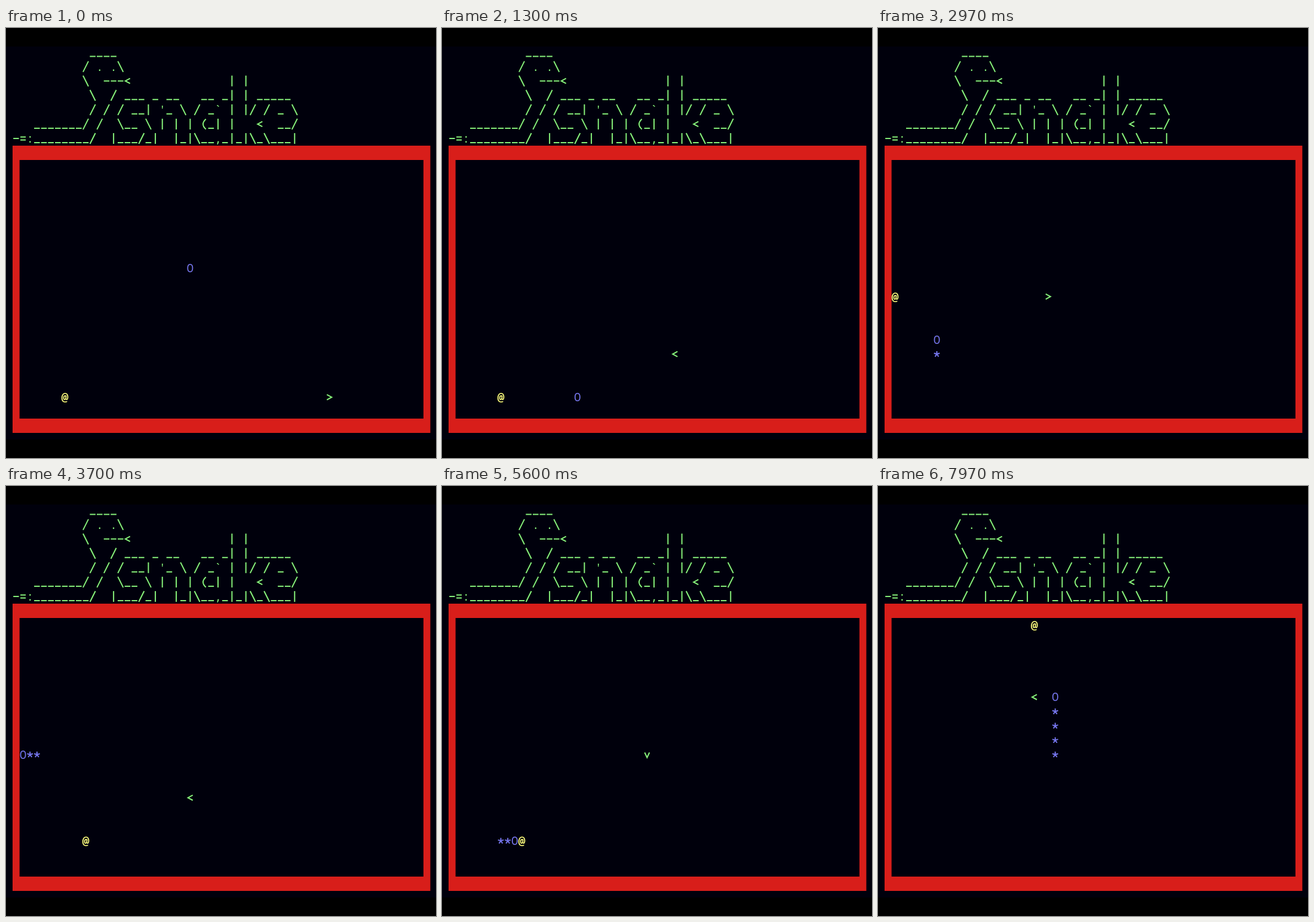
Animation of 720x720 px, one loop 8000 ms. Source, as an HTML page with a canvas:

```html
<!DOCTYPE html>
<html lang="en">
<head>
<meta charset="utf-8">
<title>Snake</title>
<style>
html, body { margin: 0; height: 100%; overflow: hidden; background: #000; }
canvas { display: block; }
</style>
</head>
<body>
<canvas id="stage" width="720" height="720"></canvas>
<script>
const ctx = document.getElementById('stage').getContext('2d');
const LOOP = 8000, CELL_W = 11.66, CELL_H = 24.07, LEFT = -0.6, TOP = 197;
const GREEN = '#86f07a', BLUE = '#7474ea', YELLOW = '#f6f67a', RED = '#d81e1a', NIGHT = '#00000c';

const ART = [
  "            ____",
  "           / . .\\",
  "           \\  ---<              | |",
  "            \\  / ___ _ __   __ _| | _____",
  "            / / / __| '_ \\ / _` | |/ / _ \\",
  "    _______/ /  \\__ \\ | | | (_| |   <  __/",
  " -=:________/  |___/_|  |_|\\__,_|_|\\_\\___|"
];

// Line glyphs, drawn around the centre of a cell
const STROKES = {
  '/': 'M-4.5 9L4.5 -9',
  '\\': 'M-4.5 -9L4.5 9',
  '|': 'M0 -9V9',
  '(': 'M3 -8.5Q-6.5 0 3 8.5',
  '_': 'M-4.8 7H4.8',
  '-': 'M-4.7 0H4.7',
  '=': 'M-4.5 -2.5H4.5M-4.5 2.5H4.5',
  '<': 'M4.3 -4.3L-3.7 0L4.3 4.3',
  '>': 'M-4.3 -4.3L3.7 0L-4.3 4.3',
  '^': 'M-3.5 -1L0 -6.5L3.5 -1',
  'v': 'M-4 -3.5L0 5L4 -3.5',
  '*': 'M0 -5V0L-4.8 -1.5M0 0L4.8 -1.5M-3 4.3L0 0L3 4.3'
};
for (const c in STROKES) STROKES[c] = new Path2D(STROKES[c]);

const MOVES = { U: [0, -1, '^'], D: [0, 1, 'v'], L: [-1, 0, '<'], R: [1, 0, '>'] };

// Expands "D9L18" into the list of cells visited
function route(x, y, mark, turns) {
  const cells = [{ x, y, mark }];
  for (const [, dir, count] of turns.matchAll(/(\w)(\d+)/g)) {
    const [dx, dy, face] = MOVES[dir];
    for (let i = 0; i < count; i++) cells.push({ x: x += dx, y: y += dy, mark: face });
  }
  return cells;
}

const snake = route(26, 8, 'O', 'D9L18U7L6D6R9U6R14U4');
const rival = route(46, 17, '>', 'U3L23U4R5D3L2U7R3D7R4U2L7U5L4');
const food = [[8, 17], [2, 10], [11, 16], [25, 10], [22, 1]];

// Foods eaten after each move
let meals = 0;
const eaten = snake.map(({ x, y }) => {
  const [fx, fy] = food[meals];
  return x === fx && y === fy ? ++meals : meals;
});

// Bursts of moves: start, count, interval
const ticks = [
  [30, 9, 96], [870, 3, 15], [1070, 14, 76], [2570, 14, 86], [4400, 7, 61], [4930, 7, 61],
  [5770, 13, 66.5], [6630, 3, 70], [6930, 4, 66], [7570, 1, 0], [7830, 4, 46]
].flatMap(([start, count, gap]) => Array.from({ length: count }, (_, i) => start + i * gap));

function glyph(c, col, row, color, weight = 'normal') {
  if (c === ' ') return;
  ctx.save();
  ctx.translate(LEFT + (col + 0.5) * CELL_W, TOP + (row + 0.5) * CELL_H);
  ctx.fillStyle = ctx.strokeStyle = color;
  if (STROKES[c]) {
    ctx.lineWidth = 2;
    ctx.stroke(STROKES[c]);
  } else {
    ctx.font = weight + ' 19.4px "Noto Sans Mono", "DejaVu Sans Mono", monospace';
    ctx.textAlign = 'center';
    ctx.fillText(c, 0, 7);
  }
  ctx.restore();
}

function box(x, y, w, h, color) {
  ctx.fillStyle = color;
  ctx.fillRect(x, y, w, h);
}

function draw(t) {
  const n = ticks.filter(tick => tick <= t).length;
  box(0, 0, 720, 720, '#000');
  box(0, 31, 720, 658, NIGHT);
  box(11, 197, 699.5, 481, RED);
  box(22.7, 221, 676.3, 433, NIGHT);

  ART.forEach((line, r) => [...line].forEach((c, col) => glyph(c, col, r - ART.length, GREEN)));

  const length = eaten[n];
  glyph('@', ...food[length], YELLOW, 'bold');
  for (let i = length; i > 0; i--) glyph('*', snake[n - i].x, snake[n - i].y, BLUE);
  glyph('O', snake[n].x, snake[n].y, BLUE, '500');
  glyph(rival[n].mark, rival[n].x, rival[n].y, GREEN);
}

function frame() {
  draw(performance.now() % LOOP);
  requestAnimationFrame(frame);
}
frame();
</script>
</body>
</html>
```
